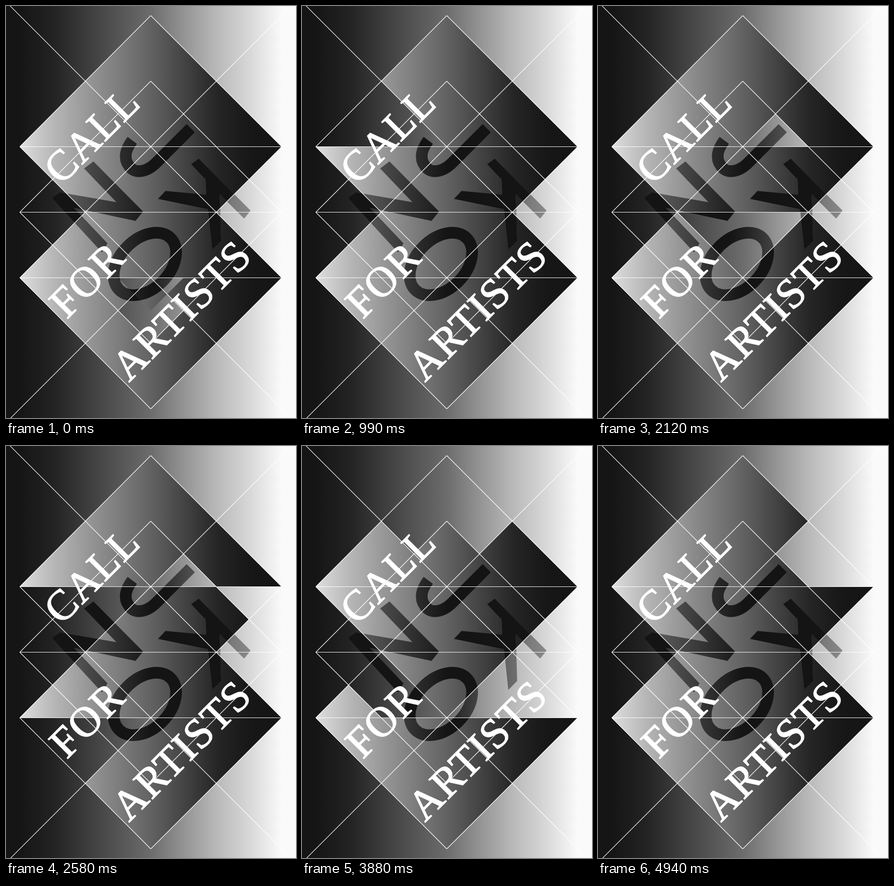
An HTML page with a canvas for the animation above (4.97 s loop, 620 px wide and 880 px high).

```html
<!DOCTYPE html>
<html lang="en">
<head>
<meta charset="utf-8">
<title>Call for artists</title>
<style>
  html, body { margin: 0; width: 620px; height: 880px; overflow: hidden; background: #141414; }
  canvas { display: block; }
</style>
</head>
<body>
<canvas id="stage" width="620" height="880"></canvas>
<script>
const ctx = document.getElementById('stage').getContext('2d');
const LOOP = 4970;

// Grid units: the lattice step is 70 px, the origin is the middle of the poster.
const STEP = 70, CX = 309.5, CY = 440.5;
const px = x => CX + x * STEP;
const py = y => CY + y * STEP;

// Grey levels, one per lattice column.
function ramp(levels) {
  const gradient = ctx.createLinearGradient(px(-4), 0, px(4), 0);
  levels.forEach((v, i) => gradient.addColorStop(i / 8, `rgb(${v},${v},${v})`));
  return gradient;
}
const outside = ramp([21, 34, 59, 84, 108, 147, 184, 215, 250]);
const inside = ramp([222, 184, 153, 125, 98, 68, 38, 23, 20]);

// Shapes around a point on a horizontal: half base r, apex up, down or both.
const up = (x, y, r) => [[x - r, y], [x, y - r], [x + r, y]];
const down = (x, y, r) => [[x - r, y], [x, y + r], [x + r, y]];
const both = (x, y, r) => [...up(x, y, r), [x, y + r]];

// Cells swapped to the outer gradient; overlapping cells cancel out.
const flips = [
  [0, 430, down(0, 2, 1)],
  [0, 660, both(0, 3, 1)],
  [790, 1260, up(-2, -2, 2)],
  [1260, 1660, down(3, 2, 1)],
  [1360, 1460, up(-1, 0, 1)],
  [1760, 2320, down(0, 0, 2)],
  [1920, 2710, up(1, -2, 1)],
  [2390, 2780, down(-2, -2, 2)],
  [2450, 3680, down(3, -2, 1)],
  [2580, 2710, down(-2, 2, 2)],
  [2980, 3680, down(2, -2, 2)],
  [3210, 3650, up(0, 0, 2)],
  [3380, 4010, both(0, -3, 1)],
  [3380, 4040, up(2, 2, 2)],
  [3780, 4010, both(0, -4, 2)],
  [3880, 4270, up(-2, 2, 2)],
  [3880, 4270, up(-3, 2, 1)],
  [4300, 4400, both(0, 4, 2)],
  [4670, LOOP, up(2, -2, 2)],
  [4670, LOOP, up(1, -2, 1)]
];

function fillShapes(shapes, fill, rule) {
  ctx.beginPath();
  for (const shape of shapes) {
    shape.forEach(([x, y], i) => ctx[i ? 'lineTo' : 'moveTo'](px(x), py(y)));
    ctx.closePath();
  }
  ctx.fillStyle = fill;
  ctx.fill(rule);
}

const lines = new Path2D();
function line(x1, y1, x2, y2) {
  lines.moveTo(px(x1), py(y1));
  lines.lineTo(px(x2), py(y2));
}
for (const y of [-2, 0, 2]) {
  line(-4, y, 4, y);
  for (const sx of [-4, 4]) for (const sy of [-4, 4]) line(sx, y, 0, y + sy);
}
for (const s of [-1, 1]) {
  line(-4.3, s * 6.3, 0, s * 2);
  line(0, s * 2, 4.3, s * 6.3);
}

const letterN = new Path2D('M98 410 115 398 236 419 167 347 187 332 293 439 277 459 145 431 217 507 205 526Z');
const letterK = new Path2D('M325 412 341 395 428 403 427 371 396 338 412 326 523 437 509 454 457 402 460 502 441 521 432 434Z');
const letterJ = new Path2D('M395 261 322 334C298 358 272 358 262 340C252 326 254 308 270 287');
const letterO = new Path2D();
letterO.ellipse(297, 551, 78, 53, -Math.PI / 4, 0, 2 * Math.PI);

function paintLetters(mode, color) {
  ctx.globalCompositeOperation = mode;
  ctx.fillStyle = ctx.strokeStyle = color;
  ctx.lineWidth = 25;
  ctx.fill(letterN);
  ctx.fill(letterK);
  ctx.stroke(letterJ);
  ctx.stroke(letterO);
  ctx.globalCompositeOperation = 'source-over';
}

function paintTitle() {
  ctx.save();
  ctx.rotate(-Math.PI / 4);
  ctx.font = '91px "Liberation Serif", serif';
  ctx.letterSpacing = '2px';
  ctx.fillStyle = ctx.strokeStyle = '#fff';
  ctx.lineWidth = 1.7;
  for (const [word, x, y] of [['CALL', -188, 355], ['FOR', -382, 566], ['ARTISTS', -383, 755]]) {
    ctx.fillText(word, x, y);
    ctx.strokeText(word, x, y);
  }
  ctx.restore();
}

function draw() {
  const t = performance.now() % LOOP;
  const active = flips.filter(([start, end]) => t >= start && t < end).map(flip => flip[2]);
  ctx.fillStyle = outside;
  ctx.fillRect(0, 0, 620, 880);
  fillShapes([both(0, -2, 4)], inside, 'nonzero');
  fillShapes([both(0, 2, 4)], inside, 'nonzero');
  fillShapes(active, outside, 'evenodd');
  // Darken by a fixed amount, never below the poster's black.
  paintLetters('lighten', 'rgb(98,98,98)');
  paintLetters('difference', 'rgb(78,78,78)');
  ctx.strokeStyle = '#fff';
  ctx.lineWidth = 1.2;
  ctx.stroke(lines);
  paintTitle();
  requestAnimationFrame(draw);
}
draw();
</script>
</body>
</html>
```
